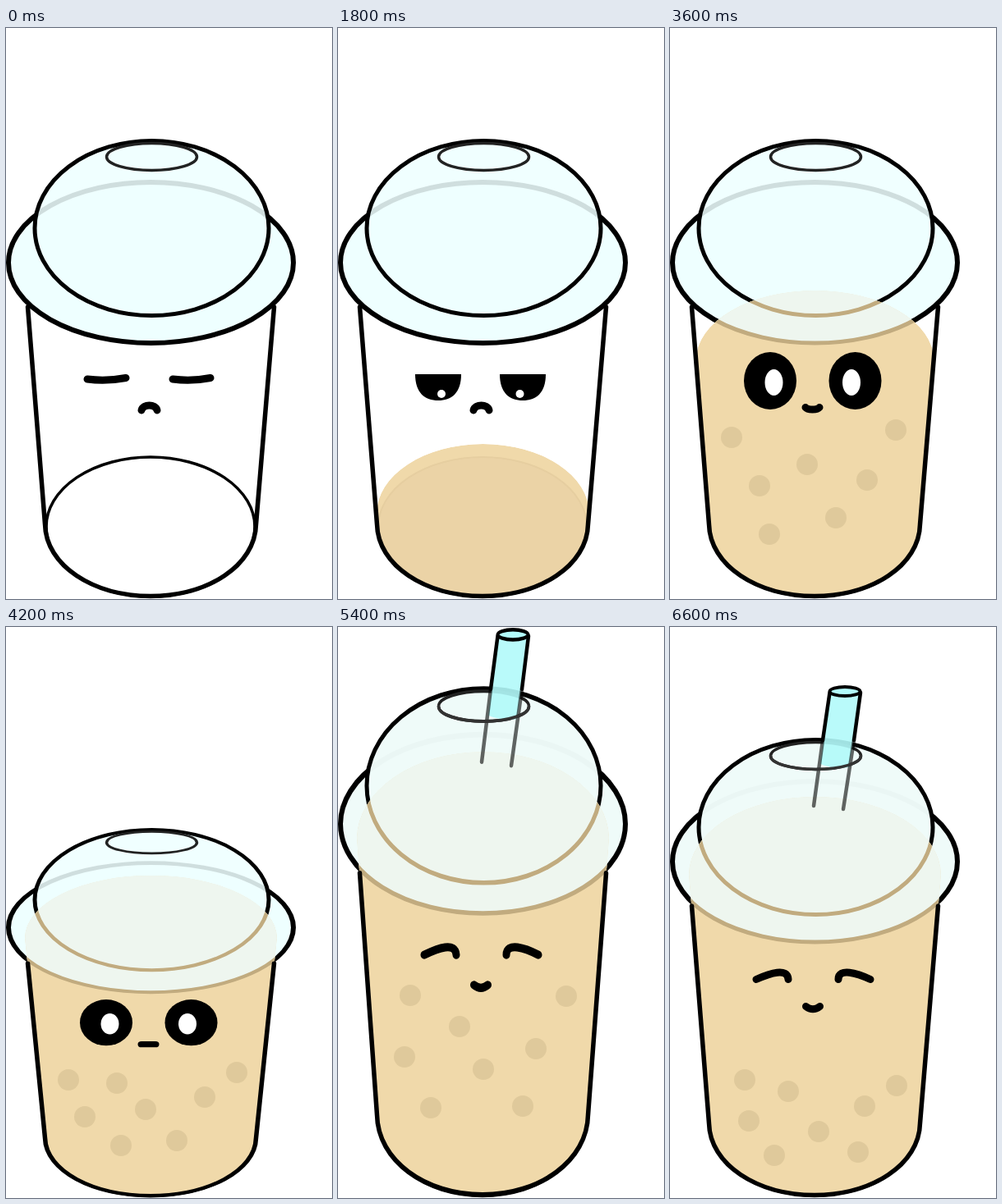
These frames come from a looping animation (397 by 696 pixels, 7400 ms). An HTML page:

```html
<!DOCTYPE html>
<html lang="en">
<head>
<meta charset="utf-8">
<title>Bubble tea</title>
<style>
  html, body { margin: 0; width: 100%; height: 100%; overflow: hidden; background: #fff; }
  svg { display: block; width: 100vw; height: 100vh; }
  .line { fill: none; stroke: #000; stroke-linecap: round; stroke-linejoin: round; }
</style>
</head>
<body>
<svg id="stage" viewBox="0 0 397 696"></svg>
<script>
const STEP = 600, LOOP = 7400, FLOOR = 696;
const TEA = '#f0d9aa', ICE = '#eeffff', MILKY_ICE = '#effbf9';

// Pearl order: upper left, inner left, upper right, right, left, bottom right, bottom left, centre
const PEARLS = {
  few: [[106, 579], [242, 578], [190, 609]],
  some: [[90, 546], [242, 564], [167, 575], [196, 603], [114, 613]],
  rise: [[75, 499], [167, 532], [275, 490], [240, 551], [109, 558], [202, 597], [121, 617]],
  squash: [[76, 552], [135, 556], [281, 543], [242, 573], [96, 597], [208, 626], [140, 632], [170, 588]],
  stretch: [[88, 449], [148, 487], [278, 450], [241, 514], [81, 524], [225, 584], [113, 586], [177, 539]],
  rest: [[91, 552], [144, 566], [276, 559], [237, 584], [96, 602], [229, 640], [127, 644], [181, 615]]
};
const between = (a, b) => a.map(([x, y], i) => [(x + b[i][0]) / 2, (y + b[i][1]) / 2]);

// level: centre height of the tea surface; scale: vertical squash or stretch
const STEPS = [
  { eyes: 'shut', mouth: 'frown' },
  { eyes: 'sleepy', mouth: 'frown' },
  { eyes: 'half', mouth: 'frown' },
  { eyes: 'half', mouth: 'frown', level: 592 },
  { eyes: 'alert', mouth: 'flat', level: 548, pearls: PEARLS.few, alarm: true },
  { eyes: 'wide', mouth: 'flat', level: 481, pearls: PEARLS.some },
  { eyes: 'big', mouth: 'smile', level: 405, pearls: PEARLS.rise },
  { eyes: 'big', mouth: 'flat', level: 302, pearls: PEARLS.squash, scale: .804 },
  { eyes: 'happy', mouth: 'grin', level: 302, pearls: between(PEARLS.squash, PEARLS.stretch), scale: .977, straw: true },
  { eyes: 'happy', mouth: 'grin', level: 302, pearls: PEARLS.stretch, scale: 1.112, straw: true },
  { eyes: 'happy', mouth: 'grin', level: 302, pearls: between(PEARLS.stretch, PEARLS.rest), scale: 1.05, straw: true },
  { eyes: 'happy', mouth: 'grin', level: 302, pearls: PEARLS.rest, straw: true }
];

const oval = (x, y, rx, ry, look = '') =>
  `<ellipse cx="${x}" cy="${y}" rx="${rx}" ry="${ry}" ${look}/>`;
const line = (d, w, look = '') =>
  `<path class="line" d="${d}" stroke-width="${w}" ${look}/>`;
const white = 'fill="#fff"';

const rim = look => oval(176.5, 286, 173.5, 98, look);
const dome = look => oval(177.5, 244, 142.5, 106.5, look);

function lid(full) {
  const ice = full ? MILKY_ICE : ICE;
  return rim(`fill="${ice}" stroke="#000" stroke-width="6"`) +
    dome(`fill="${ice}" fill-opacity="${full ? .98 : .87}" stroke="#000" stroke-width="5"`) +
    oval(177.5, 157, 55, 16.5, 'fill="none" stroke="#222" stroke-width="3.5"');
}

const cupBack = () => oval(176, 608, 127, 85, 'fill="#fff" stroke="#000" stroke-width="3.5"');
const cupFront = () => line('M26.500 340L47.500 605C48.500 655 106 692.500 176 692.500S303.500 655 304.500 605L326.500 340', 5.5);

function tea(level, id) {
  const inset = (level - 338) * 22 / 267;
  const left = 26 + inset, right = 327 - inset;
  const rx = (right - left) / 2, ry = level > 338 ? 85 : 95;
  const shape = `M${left} ${level}A${rx} ${ry} 0 0 1 ${right} ${level}L304 608A128 85 0 0 1 48 608Z`;
  const edge = 'fill="#eef6ef" stroke="#c1ab7f" stroke-width="5"';
  const base = level > 500 ? oval(176, 608, 127, 85, 'fill="#ebd3a6" stroke="#e6cea0" stroke-width="2"') : '';
  return `<clipPath id="${id}"><path d="${shape}"/></clipPath><g clip-path="url(#${id})">` +
    `<path d="${shape}" fill="${TEA}"/>${base}${rim(edge)}${dome(edge)}</g>`;
}

const lidded = depth => [94, 197].map((x, i) => {
  const y = 422 + depth;
  return `<path d="M${x} 422H${x + 56}C${x + 56} ${y - 9} ${x + 44} ${y} ${x + 28} ${y}S${x} ${y - 9} ${x} 422Z"/>` +
    oval(i ? 221.5 : 126, y - 8, 5, 5, white);
}).join('');

const open = (y, rx, ry, px, py, shift) =>
  [[122, shift], [225.5, -shift]].map(([x, s]) =>
    oval(x, y, rx, ry) + oval(x + s, 432, px, py, white)).join('');

const EYES = {
  shut: () => line('M99 428Q122 431 146 426.500M203 428Q226 431 249 426.500', 9),
  sleepy: () => lidded(21),
  half: () => lidded(32),
  alert: () => open(432, 28, 22, 4.5, 4.5, 2),
  wide: () => open(431, 30, 29, 8, 10, 3),
  big: () => open(430, 32, 35, 11, 16, 4.5),
  happy: () => line('M105 429.500C122 422 143 415 144 429.500M205 429.500C205 415 228 422 244 429.500', 9)
};
const MOUTHS = {
  frown: 'M165 466C167 458 182 458 184 466',
  flat: 'M165 463H182',
  smile: 'M165 462.500Q167 465 173.500 465T182 462.500',
  grin: 'M165.500 462.500Q174 469 182.500 462.500'
};

const straw = () =>
  '<path d="M195 80L183 167Q198 173 218 171L232 80Z" fill="#b2fafa" fill-opacity=".9"/>' +
  line('M194.500 80L186 138M232 80L224 138', 4.5) +
  line('M186 138L175 218M224 138L211 222', 4.5, 'stroke-opacity=".6" stroke-linecap="butt"') +
  line('M122.500 157A55 16.500 0 0 0 232.500 157', 3.5, 'style="stroke:#333"') +
  oval(213, 78.5, 18.5, 5.5, 'fill="#b2fafa" stroke="#000" stroke-width="4"');

const alarm = () =>
  '<path d="M362 397C361 384 397 384 396.500 399L379 491C378 497 371 497 370 491Z"/>' +
  oval(372.5, 509, 8.5, 9);

function draw(step, i) {
  const { eyes, mouth, level, pearls = [], scale = 1 } = step;
  return `<g display="none"><g transform="translate(0 ${FLOOR * (1 - scale)}) scale(1 ${scale})">` +
    cupBack() + lid(step.straw) + (level ? tea(level, 'tea' + i) : '') + cupFront() +
    EYES[eyes]() + line(MOUTHS[mouth], 9) + (step.straw ? straw() : '') + '</g>' +
    pearls.map(([x, y]) => oval(x, y, 13, 13, 'fill="#dfc99b"')).join('') +
    (step.alarm ? alarm() : '') + '</g>';
}

const stage = document.getElementById('stage');
stage.innerHTML = STEPS.map(draw).join('');
const poses = [...stage.children];
let shown = -1;

function tick() {
  const t = performance.now() % LOOP;
  const now = Math.min(STEPS.length - 1, Math.floor(t / STEP));
  if (now !== shown) {
    poses.forEach((p, i) => p.setAttribute('display', i === now ? 'inline' : 'none'));
    shown = now;
  }
  requestAnimationFrame(tick);
}
tick();
</script>
</body>
</html>
```
